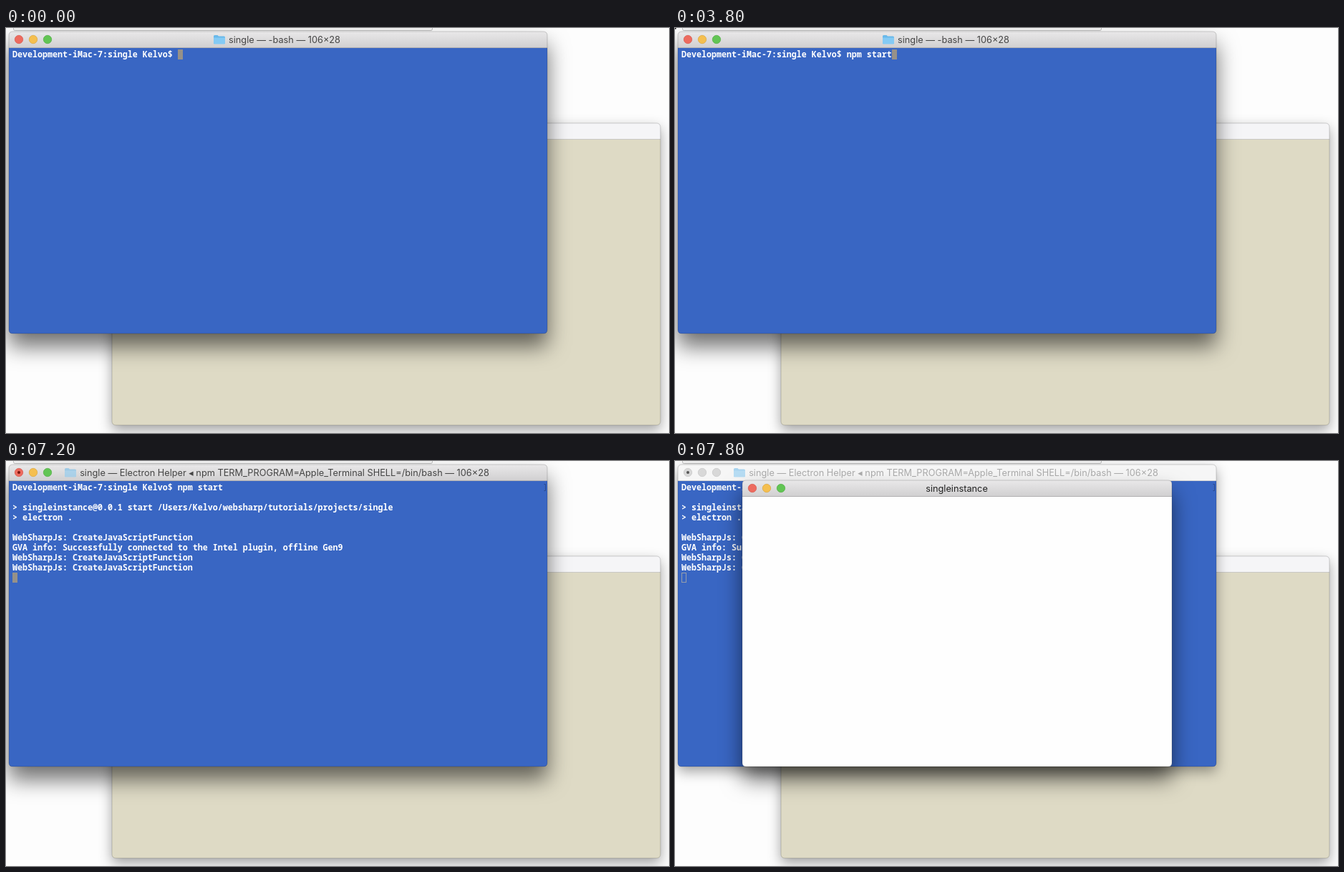
An HTML page that plays this animation: 926 by 566 pixels, repeating every 8 s.

```html
<!DOCTYPE html>
<html lang="en">
<head>
<meta charset="utf-8">
<style>
  html, body { margin: 0; width: 100%; height: 100%; overflow: hidden; background: #fdfdfd; }
  svg { display: block; width: 926px; height: 566px; }
  .mono { font: 600 11.667px "Noto Sans Mono", "DejaVu Sans Mono", monospace; fill: #fff; white-space: pre; }
  .title { font: 400 12.75px Inter, Roboto, sans-serif; text-anchor: middle; }
  .active { filter: drop-shadow(0 18px 15px rgba(0, 0, 0, .56)); }
  .idle { filter: drop-shadow(0 7px 9px rgba(0, 0, 0, .36)); }
</style>
</head>
<body>
<svg viewBox="0 0 926 566">
  <defs>
    <linearGradient id="bar" x2="0" y2="1">
      <stop stop-color="#e9e8e9"/>
      <stop offset="1" stop-color="#d1d0d1"/>
    </linearGradient>
  </defs>
  <rect width="926" height="566" fill="#fdfdfd"/>
  <path d="M10.5 0V1.5Q10.5 3.5 12.5 3.5H593Q595.5 3.5 595.5 1.5V0" fill="#f7f7f7" stroke="#bdbdbd"/>
  <g id="back"></g>
  <g id="terminal"></g>
  <g id="popup"></g>
  <rect id="speck" width="1.5" height="1.5"/>
</svg>
<script>
const LOOP = 8000;
const ROW = 14, COL = 7, LEFT = 9, TOP = 30;
const LIGHTS = ["#ed6b5f", "#f5bf4f", "#62c554"];
const RIMS = ["#d8574b", "#dba53c", "#4fae42"];
const PROMPT = "Development-iMac-7:single Kelvo$ ";
const SHELL = "npm TERM_PROGRAM=Apple_Terminal SHELL=/bin/bash";
const START_LINES = [
  "",
  "> singleinstance@0.0.1 start /Users/Kelvo/websharp/tutorials/projects/single",
  "> electron .",
  ""
];
const CALL = "WebSharpJs: CreateJavaScriptFunction";
const LOG_LINES = [CALL, "GVA info: Successfully connected to the Intel plugin, offline Gen9", CALL, CALL];

// Each key press: time and number of command letters shown from then on.
const COMMAND = "npm start";
const KEYS = [1000, 1200, 1400, 1600, 2200, 2400, 2600, 3000, 3200];
const ENTER = 4600, OUTPUT = 4800, ELECTRON = 5600, LOG = 7000, BLUR = 7400, POPUP = 7600;

const TITLES = [
  { from: 0, text: "single — -bash — 106×28", x: 389, folder: 290 },
  { from: ENTER, text: `single — ${SHELL} — 106×28`, x: 388, folder: 135 },
  { from: ELECTRON, text: `single — Electron ◂ ${SHELL} — 106×28`, x: 388, folder: 103 },
  { from: LOG, text: `single — Electron Helper ◂ ${SHELL} — 106×28`, x: 389, folder: 82 }
];

const $ = id => document.getElementById(id);
const escape = s => s.replace(/&/g, "&amp;").replace(/</g, "&lt;").replace(/>/g, "&gt;");

function frame(x, y, w, h, bar, body, line) {
  const r = 5, split = y + 22;
  return `<path d="M${x} ${split}V${y + r}q0 ${-r} ${r} ${-r}H${x + w - r}q${r} 0 ${r} ${r}V${split}z" fill="${bar}"/>
    <path d="M${x} ${split}H${x + w}V${y + h - r}q0 ${r} ${-r} ${r}H${x + r}q${-r} 0 ${-r} ${-r}z" fill="${body}"/>
    <path d="M${x} ${split + .5}h${w}" stroke="${line}"/>
    <rect x="${x}" y="${y}" width="${w}" height="${h}" rx="${r}" fill="none" stroke="#000" stroke-opacity=".22" stroke-width=".8"/>`;
}

function lights(x, y, active) {
  return LIGHTS.map((color, i) =>
    `<circle cx="${x + i * 20}" cy="${y}" r="5.7" fill="${active ? color : "#d8d8d8"}" stroke="${active ? RIMS[i] : "#c6c6c6"}" stroke-width=".7"/>`
  ).join("");
}

function folder(x, opacity) {
  return `<g opacity="${opacity}">
    <path d="M${x} 22V11.500q0-1.500 1.500-1.500h4l1.500 1.500h7.500q1.500 0 1.500 1.500V22z" fill="#69b9ea"/>
    <path d="M${x} 13.500h16V21q0 1.500-1.500 1.500h-13q-1.500 0-1.500-1.500z" fill="#84caf4"/></g>`;
}

function terminal(t) {
  const running = t >= ENTER, active = t < BLUR;
  const title = TITLES.filter(item => t >= item.from).pop();
  const typed = KEYS.filter(time => t >= time).length;
  const lines = [PROMPT + COMMAND.slice(0, typed)];
  if (t >= OUTPUT) lines.push(...START_LINES);
  if (t >= LOG) lines.push(...LOG_LINES);

  const cursorX = running ? LEFT : LEFT + lines[0].length * COL;
  const cursorY = TOP + (running ? lines.length : 0) * ROW;
  const cursor = active
    ? `<rect x="${cursorX}" y="${cursorY}" width="7" height="14" fill="#969189"/>`
    : `<rect x="${cursorX + .5}" y="${cursorY + .5}" width="6" height="13" fill="none" stroke="#969eab"/>`;

  return `<g class="${active ? "active" : "idle"}">
      ${frame(4, 5, 752, 422, active ? "url(#bar)" : "#f6f6f6", "#3966c3", active ? "#b1b0b1" : "#d2d2d2")}
    </g>
    ${lights(18, 16, active)}
    ${running ? `<circle cx="18" cy="16" r="2" fill="${active ? "#75150e" : "#555"}"/>` : ""}
    ${folder(title.folder, running ? .55 : 1)}
    <text class="title" x="${title.x}" y="21" fill="${active ? "#454545" : "#acacac"}">${title.text}</text>
    ${lines.map((line, i) => `<text class="mono" x="${LEFT}" y="${TOP + 11 + i * ROW}">${escape(line)}</text>`).join("")}
    ${running ? '<path d="M751.500 32.500h2v9h-2" fill="none" stroke="#28498d"/>' : ""}
    ${cursor}`;
}

function popup() {
  return `<g class="active">${frame(94, 27, 600, 400, "url(#bar)", "#fefefe", "#b1b0b1")}</g>
    ${lights(108, 38, true)}
    <text class="title" x="393.500" y="43" fill="#222">singleinstance</text>`;
}

$("back").innerHTML = `<g class="idle">${frame(148, 133, 766, 422, "#f5f5f7", "#dedac5", "#c9c8c4")}</g>`;
$("popup").innerHTML = popup();

let shown = "";
function render(t) {
  const markup = terminal(t);
  if (markup !== shown) $("terminal").innerHTML = shown = markup;
  $("popup").style.display = t >= POPUP ? "" : "none";
  $("speck").style.display = t >= 2200 && t < LOG ? "" : "none";
}

const begin = performance.now();
function tick() {
  render((performance.now() - begin) % LOOP);
  requestAnimationFrame(tick);
}
tick();
</script>
</body>
</html>
```
